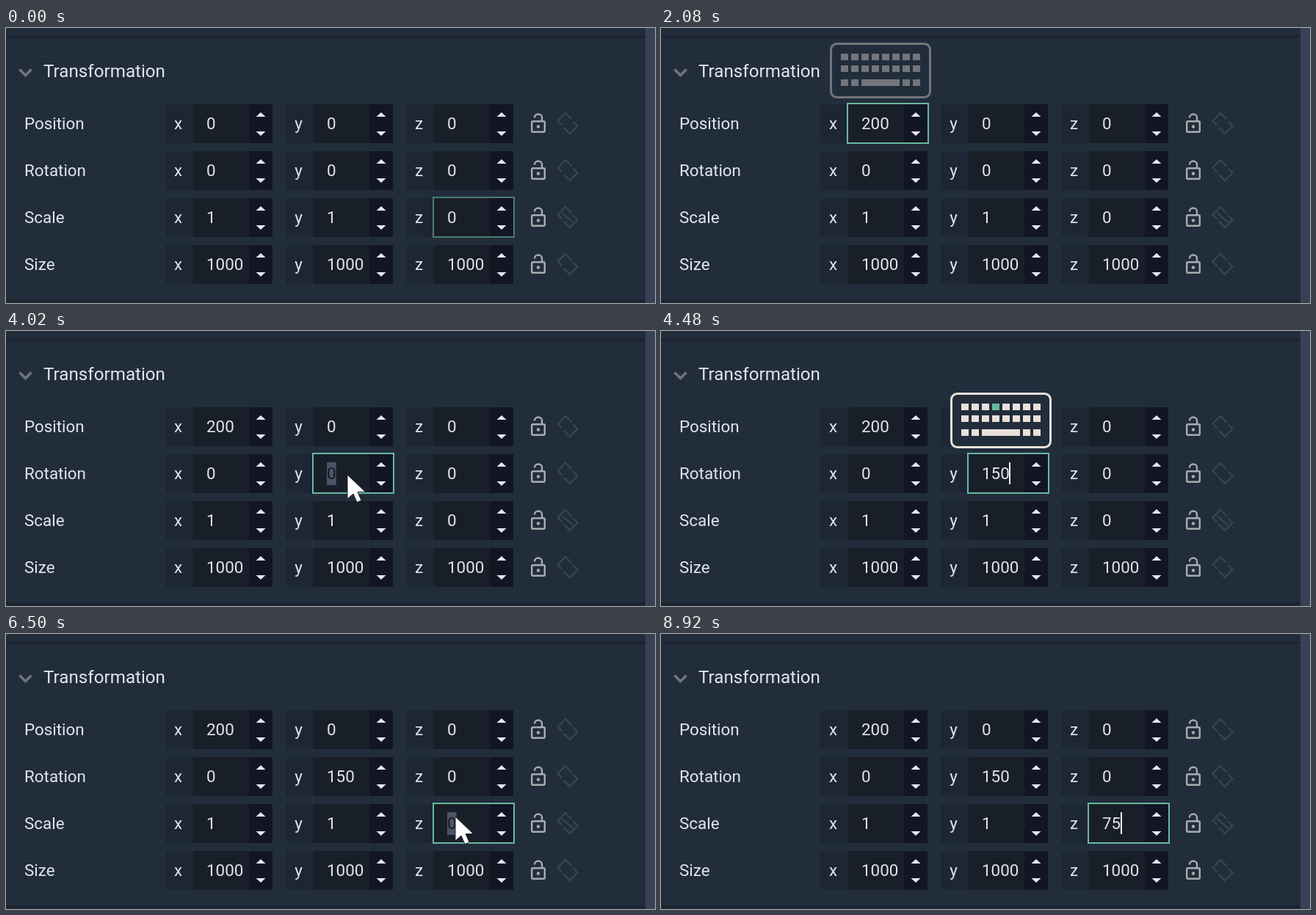
An HTML page for the animation above (9.19 s loop, 884x375 px).

```html
<!DOCTYPE html>
<html lang="en">
<head>
<meta charset="utf-8">
<title>Transformation panel</title>
<style>
  html, body { margin: 0; width: 100%; height: 100%; overflow: hidden; background: #222d3c; }
  svg { display: block; width: 884px; height: 375px; }
  text { font: 22.4px Roboto, "Open Sans", sans-serif; fill: #e2e5ea; white-space: pre; }
  .title { font-size: 24.2px; }
  .axis { text-anchor: middle; }
  .icon { fill: none; stroke: #a9acaf; stroke-width: 2.4; }
  .link { fill: none; stroke: #394452; stroke-width: 2.3; }
</style>
</head>
<body>
<svg id="stage" viewBox="0 0 884 375" xmlns="http://www.w3.org/2000/svg"></svg>
<script>
const LOOP = 9190;
const COLS = [217, 381, 545];
const ROWS = [104, 168, 232, 296];
const NAMES = ["Position", "Rotation", "Scale", "Size"];
const VALUES = [["0", "0", "0"], ["0", "0", "0"], ["1", "1", "0"], ["1000", "1000", "1000"]];
const DIGIT = 12.6;
const stage = document.getElementById("stage");

function add(tag, attrs, parent = stage, content = "") {
  const el = document.createElementNS("http://www.w3.org/2000/svg", tag);
  for (const key in attrs) el.setAttribute(key, attrs[key]);
  el.textContent = content;
  parent.append(el);
  return el;
}
const box = (x, y, width, height, fill, parent) => add("rect", { x, y, width, height, fill }, parent);
const label = (x, y, content, cls = "") => add("text", { x, y, class: cls }, stage, content);
const show = (el, on) => el.setAttribute("visibility", on ? "visible" : "hidden");

// Panel
box(0, 0, 884, 375, "#222d3c");
box(0, 10, 871, 4, "#1c2532");
box(0, 370, 871, 5, "#1c2532");
box(871, 0, 13, 375, "#394157");
add("path", { d: "M18.5 56.5 26.5 64.5 34.5 56.5", fill: "none", stroke: "#6f757d", "stroke-width": 3.6 });
label(51, 67, "Transformation", "title");

function drawCell(x, y, axis) {
  box(x, y, 38, 53, "#1d2634");
  box(x + 38, y, 76, 53, "#191f28");
  box(x + 114, y, 32, 53, "#121624");
  label(x + 17.5, y + 34, axis, "axis");
  add("path", {
    d: `M${x + 123.5} ${y + 17}l6.5-6 6.5 6zM${x + 123.5} ${y + 37}l6.5 6 6.5-6z`,
    fill: "#e3e6f3"
  });
}

function drawIcons(y, linked) {
  const g = add("g", { transform: `translate(0 ${y})` });
  add("rect", { x: 716.2, y: 23.2, width: 17.6, height: 14.6, rx: 1.5, class: "icon" }, g);
  add("path", { d: "M720 18.5v-.5a5 4.5 0 0 1 10 0v5", class: "icon" }, g);
  add("circle", { cx: 725, cy: 30.5, r: 2.2, fill: "#a9acaf" }, g);
  add("path", {
    d: "M757.5 28.5 751.5 22.5 762 12 770.5 20.5M759.5 31.5 768 40 778.5 29.5 772.5 23.5" +
      (linked ? "M757.5 20 772.5 33" : ""),
    class: "link"
  }, g);
}

const fields = ROWS.map((y, r) => {
  label(25, y + 34, NAMES[r]);
  drawIcons(y, r === 2);
  return COLS.map((x, c) => {
    drawCell(x, y, "xyz"[c]);
    const mark = box(x + 56, y + 11, DIGIT, 31, "#4a5568");
    const text = label(x + 56, y + 34, VALUES[r][c]);
    show(mark, false);
    return { mark, text };
  });
});

const ring = add("rect", { width: 110, height: 54, fill: "none", "stroke-width": 2 });
const caret = box(0, 0, 2, 30, "#f2f4f8");

// Typing hint above the edited field
const hint = add("g", {});
const hintColor = "#e9e0da";
add("rect", { x: 1.5, y: 1.5, width: 135, height: 73, rx: 8, fill: "#222d3c", stroke: hintColor, "stroke-width": 3 }, hint);
const keys = [];
for (let i = 0; i < 16; i++) keys.push(box(15 + 14 * (i % 8), i < 8 ? 15 : 31, 10, 9, hintColor, hint));
for (const [x, w] of [[15, 10], [29, 10], [43, 52], [99, 10], [113, 10]]) box(x, 50, w, 9, hintColor, hint);

const pointer = add("path", {
  d: "M0 0V33L8 26 13 37.5 19 35 14 23.5H24.5Z",
  fill: "#fff", stroke: "#20242c", "stroke-width": 1, "stroke-linejoin": "round"
});

// Each edit: column/row index, then its moments
const EDITS = [
  { at: 0, focus: 565, select: 790, typed: [[1240, "2"], [1490, "20"], [1730, "200"]], caretOff: 2080,
    fade: [[1240, .8], [1490, 1], [2080, .4], [2310, 0]] },
  { at: 1, focus: 3270, select: 3510, typed: [[4250, "1"], [4480, "150"]], caretOff: 4750,
    fade: [[4250, .8], [4480, 1], [4750, .4], [4980, 0]] },
  { at: 2, focus: 6010, select: 6260, typed: [[7040, "7"], [7290, "75"]], caretOff: 7820,
    fade: [[6760, .8], [7040, 1], [7560, .7], [7820, .35], [8090, 0]] }
];
const POINTER = [
  [0, null], [70, [295, 179]], [340, [285, 132]], [1240, null],
  [2310, [335, 140]], [2530, [396, 159]], [2760, [444, 177]], [3010, [465, 196]], [4250, null],
  [4980, [535, 235]], [5210, [595, 268]], [5450, [609, 255]], [5710, [612, 249]], [6760, null]
];
const BLINK = [[0, false], [8400, true], [8650, false], [8920, true]];

function step(table, t, initial) {
  let value = initial;
  for (const [start, next] of table) if (t >= start) value = next;
  return value;
}

function render(t) {
  let active = null;
  for (const e of EDITS) {
    const { mark, text } = fields[e.at][e.at];
    const value = step(e.typed, t, "0");
    const selected = t >= e.select && t < e.typed[0][0];
    if (text.textContent !== value) text.textContent = value;
    text.style.fill = selected ? "#15191f" : "";
    show(mark, selected);
    if (t >= e.focus) active = e;
  }

  const first = t < 70;
  const at = first ? 2 : active ? active.at : 0;
  const x = COLS[at], y = ROWS[at];
  show(ring, first || active);
  ring.setAttribute("x", x + 37);
  ring.setAttribute("y", y - 1);
  ring.setAttribute("stroke", first ? "#4c7c6f" : "#69b9a0");

  const value = active ? step(active.typed, t, "") : "";
  const blinking = active && (value && t < active.caretOff || step(BLINK, t, false));
  show(caret, blinking);
  caret.setAttribute("x", x + 56 + Math.floor(DIGIT * value.length));
  caret.setAttribute("y", y + 11);

  const alpha = active ? step(active.fade, t, 0) : 0;
  show(hint, alpha > 0);
  hint.setAttribute("opacity", alpha);
  hint.setAttribute("transform", `translate(${x + 13} ${y - 84})`);
  const pressed = value && t < active.caretOff ? 2 + (value.length * 2) % 5 : -1;
  keys.forEach((key, i) => key.setAttribute("fill", i === pressed ? "#69b9a0" : hintColor));

  const tip = step(POINTER, t, null);
  show(pointer, tip);
  if (tip) pointer.setAttribute("transform", `translate(${tip[0]} ${tip[1]})`);
}

const start = performance.now();
function tick() {
  render((performance.now() - start) % LOOP);
  requestAnimationFrame(tick);
}
tick();
</script>
</body>
</html>
```
